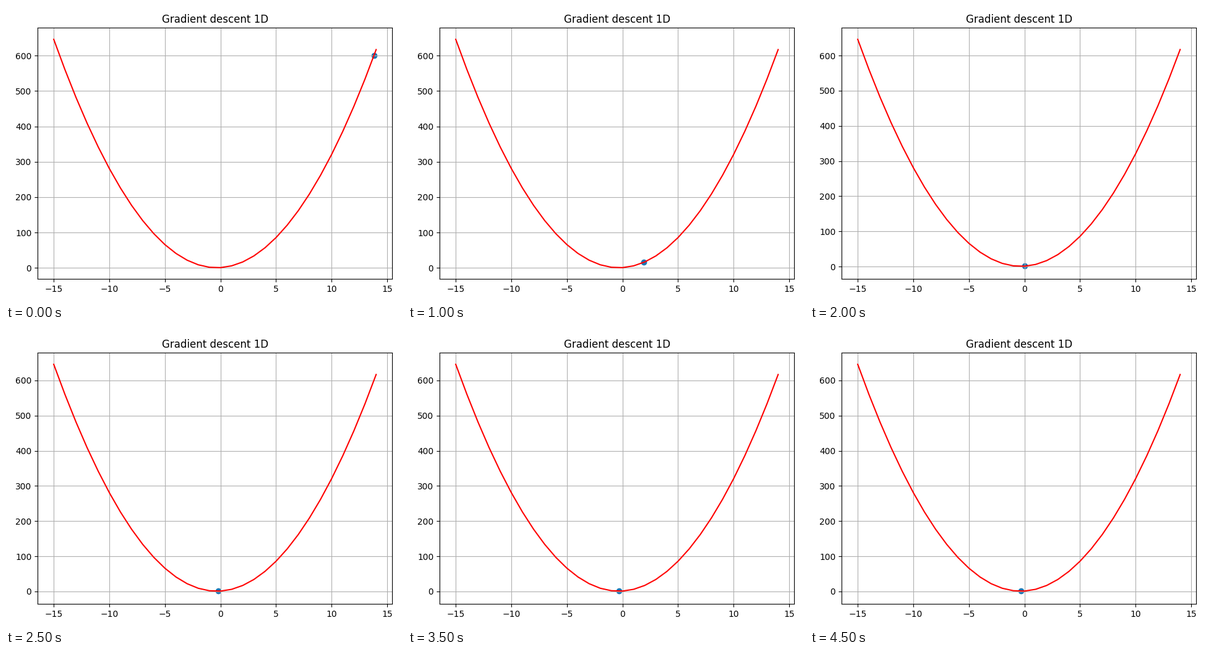
These frames come from a looping animation (640x480 px, 5 s). A matplotlib script:

```python
import numpy as np
import matplotlib.pyplot as plt
from matplotlib.animation import FuncAnimation

RATE = 0.1
START = 13.8
STEPS = 10
DOT_RADIUS = 4.1  # dot radius in y units, counted in the y limits
TOP_PX = 35.4     # room above the axes


def f(x):
    return 3 * x**2 + 2 * x + 1


def slope(x):
    return 6 * x + 2


def descend(steps):
    x = START
    for _ in range(steps):
        x -= RATE * slope(x)
    return x


plt.rcParams["font.family"] = "DejaVu Sans"
fig, ax = plt.subplots(figsize=(6.4, 4.8), dpi=100)

xs = np.arange(-15, 15)
ys = f(xs)
dot = ax.scatter([START], [f(START)])
ax.plot(xs, ys, color="red")
ax.set_title("Gradient descent 1D")
ax.grid(True)
x_pad = 0.05 * (xs[-1] - xs[0])
ax.set_xlim(xs[0] - x_pad, xs[-1] + x_pad)


def draw(i):
    x = descend(i)
    dot.set_offsets([[x, f(x)]])
    low = min(ys.min(), f(x) - DOT_RADIUS)
    high = ys.max()
    pad = 0.05 * (high - low)
    ax.set_ylim(low - pad, high + pad)
    return (dot,)


draw(0)
# The last x label overhangs the axes, so the layout settles on a second pass.
for _ in range(2):
    fig.tight_layout()
fig.subplots_adjust(top=1 - TOP_PX / 480)

anim = FuncAnimation(fig, draw, frames=STEPS, interval=500,
                     repeat=True, repeat_delay=0, blit=False)
plt.show()
```
